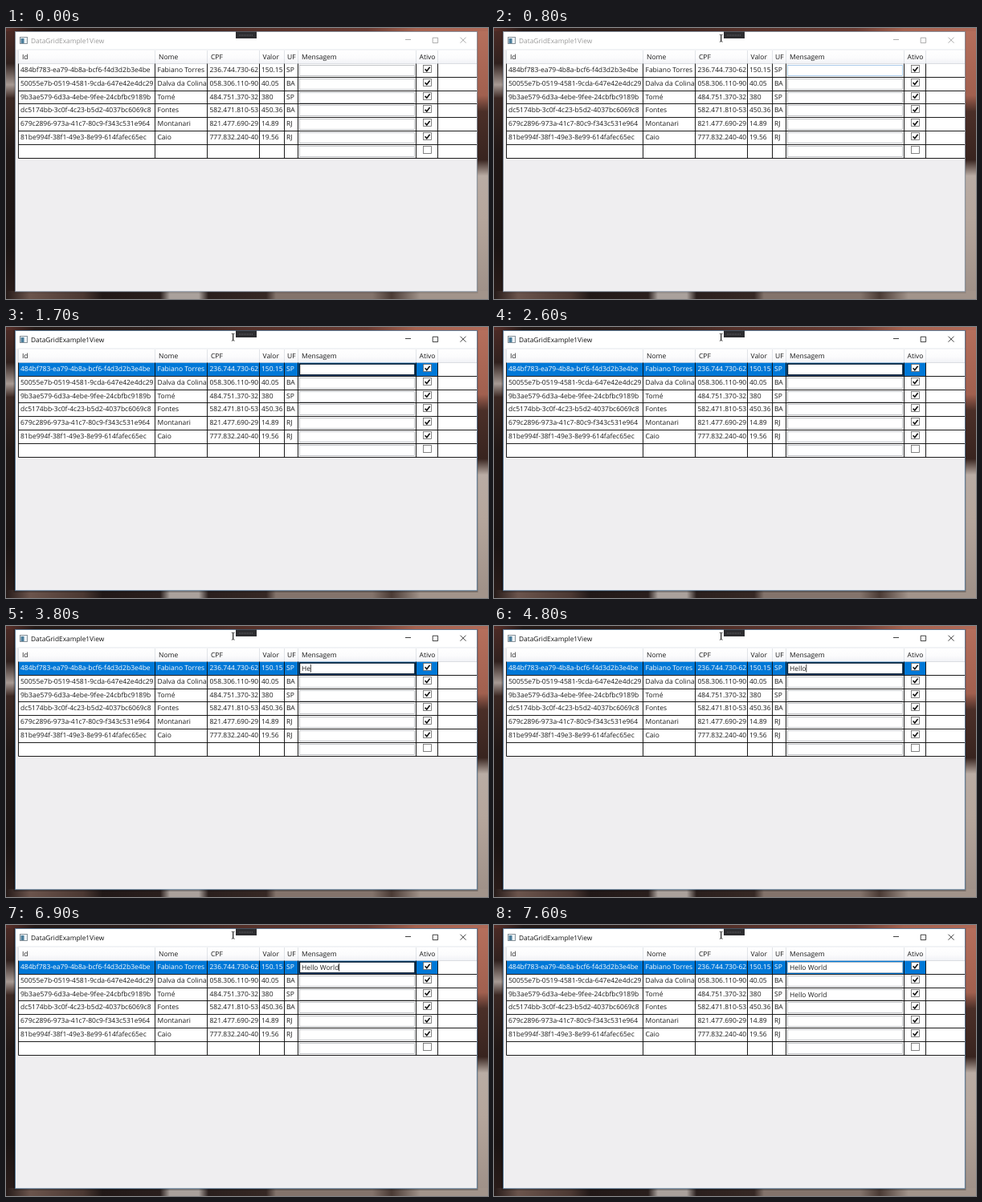
An HTML page for the animation above (8 s loop, 600 by 338 pixels).

```html
<!DOCTYPE html>
<html lang="pt">
<head>
<meta charset="utf-8">
<style>
  html, body { margin: 0; width: 100%; height: 100%; overflow: hidden; }
  svg { display: block; width: 100vw; height: 100vh; }
  text { font: 8.5px "Open Sans", "Noto Sans", sans-serif; fill: #1a1a1a; text-rendering: geometricPrecision; white-space: pre; }
  #title { font-size: 8.35px; }
</style>
</head>
<body>
<svg id="stage" viewBox="0 0 600 338" preserveAspectRatio="none"></svg>
<script>
const LOOP = 8000;
const ROW_TOP = 44.4, ROW_H = 16.8;
const columns = [15.5, 185.5, 250.5, 315.5, 346.5, 363.5, 510.5, 537.5];
const headers = [[20, 'Id'], [190, 'Nome'], [255, 'CPF'], [319.5, 'Valor'], [350, 'UF'], [368, 'Mensagem'], [514.5, 'Ativo']];
const cellX = [18, 188.5, 253.5, 318, 349];
const people = [
  ['484bf783-ea79-4b8a-bcf6-f4d3d2b3e4be', 'Fabiano Torres', '236.744.730-62', '150.15', 'SP'],
  ['50055e7b-0519-4581-9cda-647e42e4dc29', 'Dalva da Colina', '058.306.110-90', '40.05', 'BA'],
  ['9b3ae579-6d3a-4ebe-9fee-24cbfbc9189b', 'Tomé', '484.751.370-32', '380', 'SP'],
  ['dc5174bb-3c0f-4c23-b5d2-4037bc6069c8', 'Fontes', '582.471.810-53', '450.36', 'BA'],
  ['679c2896-973a-41c7-80c9-f343c531e964', 'Montanari', '821.477.690-29', '14.89', 'RJ'],
  ['81be994f-38f1-49e3-8e99-614fafec65ec', 'Caio', '777.832.240-40', '19.56', 'RJ'],
  []
];
const message = 'Hello World';
const keyTimes = [3300, 3800, 4100, 4600, 4700, 5300, 5900, 6500, 6600, 6800, 6900];
const ACTIVATE = 900, SELECT = 1000, COMMIT = 7500;

const rect = (x, y, w, h, fill, more = '') => `<rect x="${x}" y="${y}" width="${w}" height="${h}" fill="${fill}" ${more}/>`;
const path = (d, stroke, width = 1, more = '') => `<path d="${d}" fill="none" stroke="${stroke}" stroke-width="${width}" ${more}/>`;
const label = (x, y, s, more = '') => `<text x="${x}" y="${y}" ${more}>${s}</text>`;
const gradient = (id, dir, stops) => `<linearGradient id="${id}" x2="${dir === 'x' ? 1 : 0}" y2="${dir === 'y' ? 1 : 0}">` +
  stops.map(([at, color]) => `<stop offset="${at}" stop-color="${color}"/>`).join('') + '</linearGradient>';
const pixel = y => Math.floor(y) + .5;

function backdrop() {
  return '<defs>' +
    gradient('top', 'x', [[0, '#5a2f29'], [.06, '#231917'], [.3, '#30211e'], [.5, '#543029'], [.75, '#6a3c33'], [.85, '#a5624f'], [1, '#b06a58']]) +
    gradient('left', 'y', [[0, '#4a2a25'], [.12, '#30211e'], [.2, '#a79a94'], [.25, '#3b2823'], [.45, '#211816'], [.8, '#1b1413'], [1, '#2b1d1a']]) +
    gradient('right', 'y', [[0, '#b56f5c'], [.24, '#a1604f'], [.3, '#4b2f28'], [.48, '#38241f'], [.54, '#b9aca4'], [.7, '#b5a69c'], [1, '#9d8f87']]) +
    gradient('bottom', 'x', [[0, '#251a18'], [.05, '#6b544c'], [.16, '#4b3832'], [.2, '#211817'], [.32, '#2a1f1d'], [.34, '#aaa19c'],
      [.4, '#aaa19c'], [.42, '#2a1f1d'], [.54, '#362824'], [.56, '#83736b'], [.76, '#83736b'], [.8, '#4a3a34'], [.86, '#a2948b'], [1, '#a2948b']]) +
    gradient('head', 'y', [[0, '#ffffff'], [.55, '#fcfcfd'], [1, '#f1f2f6']]) + '</defs>' +
    rect(0, 0, 600, 6, 'url(#top)') + rect(0, 4, 12, 334, 'url(#left)') +
    rect(586, 4, 14, 334, 'url(#right)') + rect(0, 328, 600, 10, 'url(#bottom)');
}

function windowFrame() {
  return rect(9.5, 4, 578, 327, '#000', 'id="shadow"') +
    rect(11.5, 4.5, 574.8, 324.3, '#efeef0', 'id="frame" stroke="#7d8b9b" stroke-width=".8"') +
    rect(12, 5, 574, 22, '#fff') +
    rect(17.5, 11.5, 9, 8, '#eef3f6', 'stroke="#7c8790" stroke-width=".9"') + rect(18.5, 13, 4, 6, '#4c7f9c') +
    label(31, 18.6, 'DataGridExample1View', 'id="title"') +
    path('M497 14.5h7M531.2 12.2h6.4v6.4h-6.4zM565.5 11.7l7 7m0-7l-7 7', '#999', .8, 'id="buttons"') +
    rect(286, 4.5, 26, 8.5, '#2d2d30') + path('M290 9h18', '#4c4c50', 2, 'stroke-dasharray="1 1"');
}

function grid() {
  const bottom = pixel(ROW_TOP + ROW_H * people.length);
  let out = rect(15.5, 27, 570.5, 17.4, 'url(#head)') + path('M15 27h571', '#d9dde4', .7) +
    rect(15.5, ROW_TOP, 570.5, bottom - ROW_TOP, '#fff') +
    rect(15.5, ROW_TOP, 522, ROW_H, '#0078d7', 'id="selection"') +
    path('M15 44.5H586', '#c8ccd2', .6);
  columns.forEach(x => out += path(`M${x} 28V44`, '#d5d8de', .7) + path(`M${x} 44.5V${bottom}`, '#111', .95));
  headers.forEach(([x, s]) => out += label(x, 39.3, s));
  people.forEach((person, i) => {
    const y = ROW_TOP + i * ROW_H;
    out += path(`M15.5 ${pixel(y + ROW_H)}H586`, '#111', .95);
    person.forEach((s, c) => out += label(cellX[c], y + 10.5, s, i ? '' : 'class="first"'));
    out += rect(365.5, pixel(y + 2), 143, 13, '#fff', `id="box${i}" stroke="#b4b6ba" stroke-width=".8"`) +
      rect(519.5, pixel(y + 2), 10, 9, '#fff', 'stroke="#666" stroke-width=".8"');
    if (person.length) out += path(`M521.6 ${y + 6.9}l2.2 2.4 3.8-5`, '#111', 1.6);
  });
  return out +
    rect(365.5, 46, 143.5, 13.9, 'none', 'id="focus" stroke="#06111c" stroke-width="1.4"') +
    label(368, 56.3, '', 'id="typed"') + label(368, 89.9, '', 'id="mirror"') +
    path('M0 47.8v10', '#111', .8, 'id="caret"');
}

const stage = document.getElementById('stage');
stage.innerHTML = backdrop() + windowFrame() + grid() +
  path('M280.9 8.2q1.8 0 1.8 1v7q0 1-1.8 1m3.6-9q-1.8 0-1.8 1v7q0 1 1.8 1', '#222', .9, 'id="pointer"');
const el = id => document.getElementById(id);
const firstRow = [...document.querySelectorAll('.first')];
const show = (id, on) => el(id).setAttribute('visibility', on ? 'visible' : 'hidden');
const mix = (a, b, k) => `rgb(${a.map((v, i) => Math.round(v + (b[i] - v) * k))})`;

function render(t) {
  const active = t >= ACTIVATE, selected = t >= SELECT, editing = selected && t < COMMIT;
  const typed = message.slice(0, keyTimes.filter(k => t >= k).length);
  const hover = t >= COMMIT ? 0 : Math.min(1, Math.floor(t / 100) / 5);

  el('title').style.fill = active ? '#111' : '#999';
  el('buttons').setAttribute('stroke', active ? '#111' : '#999');
  el('shadow').setAttribute('opacity', active ? .25 : .1);
  el('frame').setAttribute('stroke', active ? '#4f7698' : '#7d8b9b');
  el('box0').setAttribute('stroke', mix([180, 182, 186], [150, 190, 228], hover));
  show('pointer', t >= 100);
  show('selection', selected);
  show('focus', editing);
  firstRow.forEach(node => node.style.fill = selected ? '#fff' : '');

  el('typed').textContent = typed;
  el('mirror').textContent = t >= COMMIT ? message : '';
  const blinkOn = Math.floor((t - 1000) / 500) % 2 === 0;
  show('caret', editing && t >= 1100 && (typed || blinkOn));
  const caretX = 368.3 + (typed ? el('typed').getComputedTextLength() : 0);
  el('caret').setAttribute('transform', `translate(${caretX} 0)`);
}

const start = performance.now();
function tick() {
  render((performance.now() - start) % LOOP);
  requestAnimationFrame(tick);
}
tick();
</script>
</body>
</html>
```
